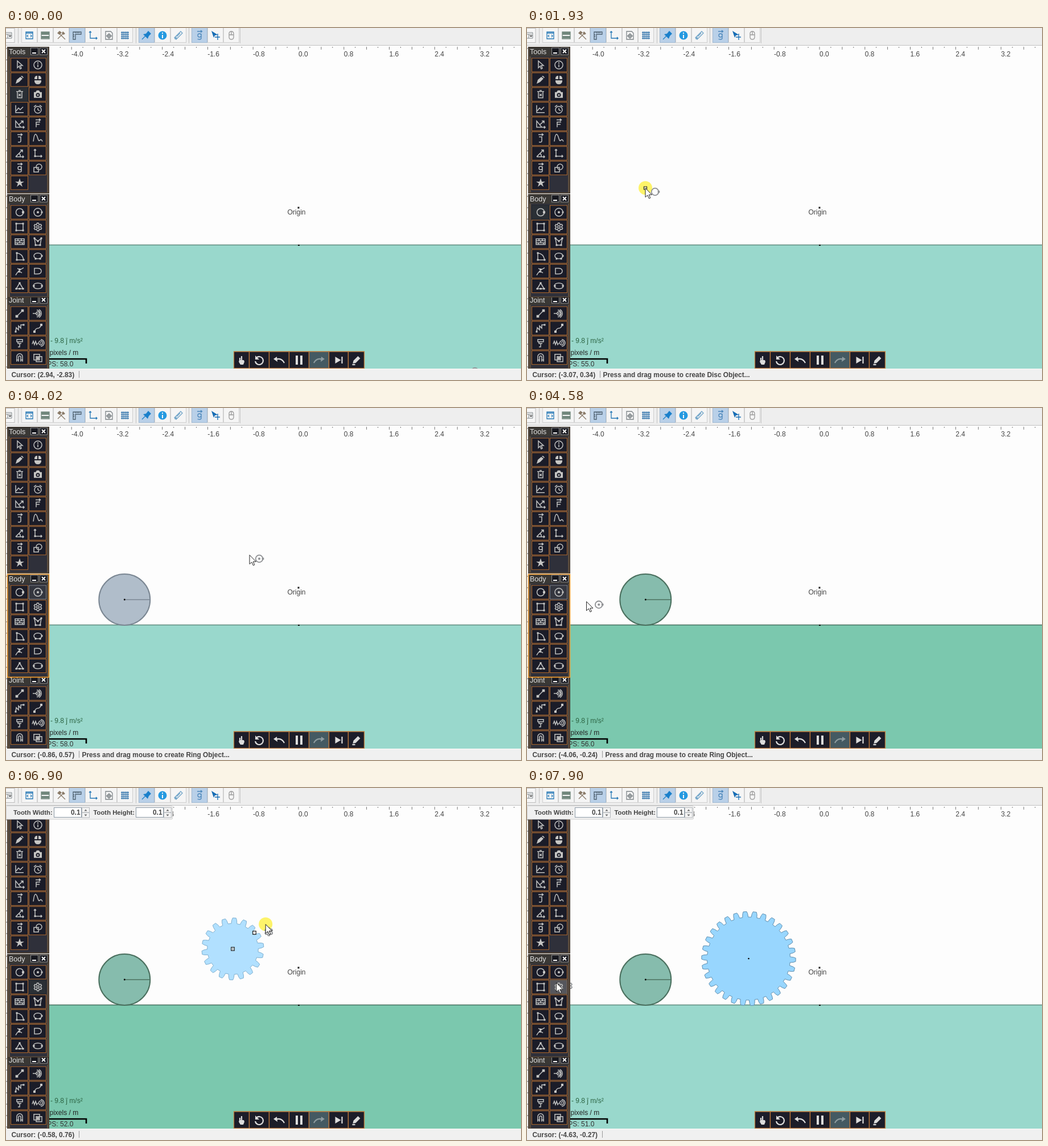
Write an HTML page that moves like this. It is 905x619 px and loops after 8 s.

```html
<!DOCTYPE html>
<html lang="en">
<head>
<meta charset="utf-8">
<title>Physics sandbox</title>
<style>
html, body { margin: 0; width: 100%; height: 100%; overflow: hidden; background: #fdfdfd; }
svg { display: block; width: 905px; height: 619px; }
text { font: 12px "Liberation Sans", Arial, sans-serif; white-space: pre; }
.b { font-weight: bold; font-size: 11.85px; fill: #444; }
.s { font-weight: bold; font-size: 11.3px; fill: #444; }
</style>
</head>
<body>
<svg id="stage" viewBox="0 0 905 619" xmlns="http://www.w3.org/2000/svg"></svg>
<script>
const LOOP = 8000, SCALE = 99.7, OX = 514, OY = 316;
const svg = document.getElementById('stage');

// Markup helpers
const rect = (x, y, w, h, fill, more = '') => `<rect x="${x}" y="${y}" width="${w}" height="${h}" fill="${fill}" ${more}/>`;
const line = (d, color, w = 1, more = '') => `<path d="${d}" fill="none" stroke="${color}" stroke-width="${w}" ${more}/>`;
const text = (x, y, s, more = '') => `<text x="${x}" y="${y}" ${more}>${s}</text>`;
const ring = (x, y, r, ry = r) => `M${x - r} ${y}a${r} ${ry} 0 1 0 ${2 * r} 0a${r} ${ry} 0 1 0 ${-2 * r} 0Z`;
const box = (x, y, r = 1.5) => `M${x - r} ${y - r}h${2 * r}v${2 * r}h${-2 * r}Z`;
const boxes = (...p) => p.map(([x, y]) => box(x, y)).join('');

function gearPath(x, y, r, n, height, half, phase) {
  const d = [];
  const at = (a, q) => d.push((x + q * Math.cos(a)).toFixed(2) + ' ' + (y + q * Math.sin(a)).toFixed(2));
  for (let i = 0; i < n; i++) {
    const a = phase + i * 2 * Math.PI / n;
    const side = [[half, 0], [half * .88, .6], [half * .6, 1]];
    for (const [w, h] of side) at(a - w / (r + h * height), r + h * height);
    for (const [w, h] of side.reverse()) at(a + w / (r + h * height), r + h * height);
  }
  return 'M' + d.join('L') + 'Z';
}
const smallGear = gearPath(0, 0, 4.8, 6, 2.2, 2, .5) + ring(0, 0, 2.2);
const vector = 'M-4-7H4M2-9L4.5-7 2-5';

// Panel icons: [stroked path, filled path]
const tools = [
  ['M-4-7V5L-1 2 1 7 3 6 1 1H5Z'],
  [ring(0, 0, 7) + 'M0-1V4', box(0, -3.5, 1)],
  ['', 'M-7 7L-5 0 1-5 5-2-1 4ZM2-6L4-7 7-4 6-3Z'],
  ['', 'M-6-1V-2Q-6-7-1-7V-1ZM1-1V-7Q6-7 6-2V-1ZM-6 1H6V3Q5 8 0 8T-6 3Z'],
  ['M-4-4V6H4V-4M-6-5H6M-2-7H2M-2-1L2 3M2-1L-2 3'],
  ['', 'M-7-4H-4L-2-7H2L4-4H7V6H-7Z' + ring(0, 1, 3.5) + ring(0, 1, 1.6)],
  ['M-7-7V6H7M-6 3L-2-2 1 1 6-4'],
  [ring(0, 1, 6) + 'M0-2V1L3 3M-7-4L-3-7M7-4L3-7'],
  ['M-7 6V-5L2 6ZM-1 1L6-5M2 6H8M6 4L8 6 6 8M2-5H6V-1'],
  ['M-3 6V-3H4M-3 1H3' + vector],
  ['M-3-3H2V4Q2 7-3 6' + vector],
  ['M-8 5C-6-12-3-10 0 0S4-4 8 5'],
  ['M-7 6L5-6M1-6H5V-2M-7 6H7M5 4L7 6 5 8M-1 0Q2 3 1 6'],
  ['M-5-7V5H7M-7-5L-5-7-3-5M5 3L7 5 5 7', box(-5, 5, 1.5)],
  [ring(0, 0, 3) + 'M3-3V5Q3 7 0 7T-3 6' + vector],
  [ring(2, -2, 5) + 'M-7-1H1V7H-7Z'],
  ['', 'M0-8L2-2H8L3 1 5 7 0 3-5 7-3 1-8-2H-2Z']
];
const body = [
  [ring(0, 0, 6.5), box(6, 0, 2)],
  [ring(0, 0, 7), ring(0, 0, 2) + box(7, 0)],
  ['M-6-6H6V6H-6Z', boxes([-6, -6], [6, -6], [-6, 6], [6, 6])],
  [smallGear],
  ['M-8-5H8V5H-8ZM-8-1.5H8M-8 2H8M-3-5V-1.5M3-5V-1.5M0-1V2M-4 2V5M5 2V5'],
  ['M-6-6L0-1 6-6 4 6H-4Z', boxes([-6, -6], [6, -6], [-4, 6], [4, 6], [0, -1])],
  ['M-5-6V6H7Q5-5-5-6Z', boxes([-5, -6], [-5, 6], [7, 6])],
  [ring(0, -1, 7, 5), boxes([-4, 4], [4, 4], [7, -1])],
  ['M-7 7Q-3-1 7-6M-4-5L1-2M-1 0L4 3', boxes([-1, 1], [0, -3])],
  ['M-6-5H-1Q6-5 6 0T-1 5H-6Z'],
  ['M0-5L-6 5H6Z', boxes([0, -5], [-6, 5], [6, 5], [0, 5])],
  [ring(0, 0, 8, 5), boxes([-7, 0], [7, 0])]
];
const joint = [
  ['M-5 5L5-5', box(-5, 5, 2.3) + box(5, -5, 2.3)],
  [ring(0, 0, 3) + 'M-2-6A6 6 0 0 1-2 6M2-7A8 8 0 0 1 2 7M-9 0H-3', box(0, 0, 1)],
  ['M-7 6L-6-1-2 3-2-4 2 0 2-6 7-6', box(-7, 6) + box(7, -6)],
  ['M-6 6Q-4 0 0 0T6-6', box(-6, 6, 2) + box(6, -6, 2)],
  ['M-5-6H5V-2H-5ZM-3-2V1H3M0 1V7H-3'],
  [ring(5, 0, 3.5) + 'M-10 2L-8-3-6 3-4-3-2 3 0 0M5-6A6 6 0 0 1 5 6', box(5, 0, 1)],
  ['M-5 7V-2A5 5 0 0 1 5-2V7M-2 7V-1A2 2 0 0 1 2-1V7M-6 4H-1M1 4H6'],
  ['M-7-6H3V4H-7ZM-3-2H7V7H-3Z', 'M-2-1H2V3H-2Z']
];

function button(icon, x, y, id) {
  const [s, f = ''] = icon;
  return rect(x, y - 12, 30, 24, '#1b1c28', `stroke="#b0692c" id="${id}"`) +
    `<g transform="translate(${x + 15.5} ${y})">${line(s, '#c0c1c0', 1.5)}<path d="${f}" fill="#c6c6c4" fill-rule="evenodd"/></g>`;
}
function panel(name, top, bottom, titleY, firstRow, icons) {
  const h = bottom - top;
  let s = rect(2, top, 74, h, '#594b3d') + rect(4, top + 1, 70, titleY + 8 - top, '#3a3835');
  s += rect(7, titleY + 9, 65, bottom - titleY - 11, '#2f303a');
  s += rect(2.5, top + .5, 73, h - 1, 'none', `id="${name}Edge"`);
  s += text(5, titleY + 5, name, 'fill="#e0e0e0" style="font-size:12.5px"');
  for (const x of [43, 59]) {
    s += rect(x + .5, titleY - 6, 13, 12, '#17181f', 'stroke="#8b8c90"');
  }
  s += line(`M46 ${titleY + 3}h7`, '#fff', 2) + line(`M63 ${titleY - 3}l6 6m0-6l-6 6`, '#fff', 1.8);
  icons.forEach((icon, i) => {
    s += button(icon, i % 2 ? 40.5 : 8.5, firstRow + 25.9 * (i >> 1), name + i);
  });
  return s;
}

function topBar() {
  const blue = '#2477b5', gray = '#7d8488';
  const items = [
    [41, 0, 'M-6-6H6V6H-6ZM-6-4H6M-2-1L-4 1-2 3M2-1L4 1 2 3', '', blue],
    [69, 0, 'M-7-6H7V6H-7Z', 'M-7-6H7V-1H-7ZM-7 1H7V5H-7Z', '#71877c'],
    [97, 0, 'M-6 6L5-5M-3-3L7 7', 'M-7-4L-3-8 1-5-3-1ZM3-7L7-3 4-1 1-4Z', '#8a7a68'],
    [125, 1, 'M-7-6H7V-2H-3V7H-7ZM-3-6V-4M0-6V-4M3-6V-4M-7-1H-5M-7 2H-5', '', '#4f6170'],
    [153, 0, 'M-5-7V5H7M-7-5L-5-7-3-5M5 3L7 5 5 7', '', blue],
    [181, 0, 'M-6-7H3L6-4V7H-6Z' + ring(0, 1, 3) + 'M0-4V6M-5 1H5', '', gray],
    [209, 0, 'M-5-7V7M-1.7-7V7M1.7-7V7M5-7V7M-7-5H7M-7-1.7H7M-7 1.7H7M-7 5H7', '', '#3f7cb0'],
    [247, 1, 'M-8 7L-1 0', 'M-6-2L-1-3 3-8 8-3 4 1 2 6Z', '#1b80cb'],
    [275, 0, '', ring(0, 0, 7.5) + 'M-1-5H1V-3H-1ZM-1-1H1V5H-1Z', '#2599e0'],
    [303, 0, 'M-7 4L4-7 7-4-4 7ZM-3 2L3-4', 'M-7 7L-5 2-2 5Z', '#70a4c8'],
    [340, 1, ring(0, 0, 3) + 'M3-3V5Q3 7 0 7T-3 6' + vector, '', '#4c87bb'],
    [368, 0, 'M4-3V8M-1 3H8', 'M-7-8L4-1-1 0-3 4Z', '#176db5'],
    [396, 0, 'M-4-3Q-4-7 0-7T4-3V3Q4 7 0 7T-4 3ZM-4-1H4M0-7V-1', '', '#9b9b9b']
  ];
  let s = rect(0, 0, 905, 31, '#eeeeee') + rect(0, 30, 905, 1, '#c2c2c2');
  s += rect(-10, .5, 25, 25, '#f7f7f7', 'stroke="#bbb"') + line('M-1 8H10V18H-1M0 11H9M3 11V18', gray) + '<path d="M4 13h6l-3 3z" fill="#555"/>';
  for (const [x, on, d, fill, c] of items) {
    s += rect(x - 13.5, -.5, 27, 26, on ? '#b9d0e8' : '#f5f5f5', `stroke="${on ? '#9fb8d2' : '#cfcfcf'}"`);
    s += `<g transform="translate(${x} 13)">${line(d, c, 1.3)}<path d="${fill}" fill="${c}" fill-rule="evenodd"/></g>`;
  }
  for (const x of [21.5, 228.5, 321.5, 411.5]) s += line(`M${x} 0V27`, '#c4c4c4');
  return s;
}

function ruler() {
  let s = rect(0, 31, 905, 24, '#fdfdfd');
  for (let i = -26; i < 20; i++) {
    const x = OX + i * SCALE / 5;
    s += line(`M${x.toFixed(1)} 33v${i % 2 ? 2 : 5}`, '#777');
    if (i % 4 === 0) s += text((x - (i < 0 ? .3 : 0)).toFixed(1), 50, (i / 5).toFixed(1), 'fill="#444"');
  }
  return s;
}

function player() {
  const edges = [400, 427, 462, 497, 532, 567, 601, 629];
  const icons = [
    ['M-3 1V-4M0 0V-7', 'M-4 0L4 0 5 3 3 8H-2L-5 3Z'],
    ['M-5-4A7 7 0 1 1-7 2', 'M-7-8V-1H0Z'],
    ['M-6-1Q4-5 9 5', 'M-10-2L-4-6-3 3Z'],
    ['', 'M-6-8H-2V8H-6ZM2-8H6V8H2Z'],
    ['M6-1Q-4-5-9 5', 'M10-2L4-6 3 3Z'],
    ['M6-6V6', 'M-6-6L4 0-6 6Z'],
    ['M-7 8H-2', 'M-6 6L-5 1 3-7 7-3-1 5Z']
  ];
  return icons.map(([d, f], i) => {
    const x = edges[i], w = edges[i + 1] - x, off = i === 4, c = off ? '#8d9ca0' : '#dcdcdc';
    return rect(x + .5, 569, w, 29.5, off ? '#445a62' : '#1c1d29') +
      line(`M${x + .5} 569h${w}v29.5h${-w}Z`, '#c07a3c', 1.3) +
      `<g transform="translate(${x + w / 2 + .5} 584)">${line(d, c, 2.2)}<path d="${f}" fill="${c}"/></g>`;
  }).join('');
}

function spinner(x, label, labelX) {
  return text(labelX, 47, label, 'class="s"') + rect(x + .5, 34.5, 48, 17, '#fff', 'stroke="#8d9aa6"') +
    text(x + 46.5, 47, '0.1', 'class="b" text-anchor="end"') +
    [34.5, 43.5].map(y => rect(x + 49.5, y, 13, 8.5, '#f4f4f4', 'stroke="#b4b8bc"')).join('') +
    `<path d="M${x + 53.5} 40.5l2.5-3 2.5 3zM${x + 53.5} 46.5l2.5 3 2.5-3z" fill="#666"/>`;
}

let leftTicks = '';
for (let y = 36; y < 599; y += 20) leftTicks += `M0 ${y}h2`;

svg.innerHTML =
  rect(0, 0, 905, 619, '#fdfdfd') + ruler() +
  rect(0, 381, 905, 220, '#99d8cc', 'id="ground"') +
  '<path id="surface" d="M0 381.5H905" stroke-width="1.7"/>' +
  rect(512.5, 314.5, 3, 3, '#222') + rect(513, 381, 3, 2, '#111') +
  text(494.5, 328, 'Origin', 'fill="#444"') +
  '<g id="disc"><circle id="discBody" stroke-width="2"/><path id="spoke" stroke-width="1.6"/><circle r="1.4"/></g>' +
  '<path id="gear" stroke-linejoin="round"/><g id="dot"><circle r="1.3"/></g>' +
  '<circle id="click" r="12" fill="#fdf36a"/><path id="grips" fill="#fff" fill-opacity=".6" stroke="#222" stroke-width="1.2"/>' +
  '<g id="badge"><path id="badgeLine" fill="none" stroke="#8f9194" stroke-width="1.8"/><path id="badgeFill" fill="#8f9194"/></g>' +
  text(78, 554, '- 9.8 ĵ m/s²', 'fill="#2d6544"') + text(76.5, 575, 'pixels / m', 'fill="#222"') +
  line('M70 582H141V590', '#000', 2.6) + text(65, 595, '', 'fill="#333" id="fps"') +
  rect(0, 31, 3, 570, '#f3f3f3') + line(leftTicks, '#666') +
  panel('Tools', 33, 291, 41, 65, tools) +
  panel('Joint', 474, 600, 478, 502, joint) +
  panel('Body', 292, 474, 300, 324, body) +
  player() +
  rect(0, 599, 905, 20, '#f0f0f0') + rect(0, 599, 905, 1, '#fafafa') +
  text(9.5, 614, '', 'class="b" id="coords"') + '<path id="bar" stroke="#999"/>' + text(0, 614, '', 'class="b" id="hint"') +
  topBar() +
  `<g id="options">${rect(0.5, 31.5, 292, 23.5, '#f0f0f0', 'rx="2" stroke="#d0d0d0"')}${spinner(84, 'Tooth Width:', 13)}${spinner(228, 'Tooth Height:', 153.5)}<path id="caret" d="M114.5 36v14" stroke="#222"/></g>` +
  '<circle id="press" r="12" fill="#fdf36a" fill-opacity=".75"/>' +
  '<path id="arrow" d="M0-.5V15.5L3.8 12 6.4 17.8 8.8 16.8 6.3 11.2H11.4Z" fill="#fff" stroke="#222"/>';

const el = {};
svg.querySelectorAll('[id]').forEach(n => el[n.id] = n);
const set = (id, attrs) => { for (const k in attrs) el[id].setAttribute(k, attrs[k]); };
const show = (id, on) => set(id, { visibility: on ? 'visible' : 'hidden' });
const move = (id, x, y) => set(id, { transform: `translate(${x} ${y})` });
for (const name of ['Tools', 'Joint']) set(name + 'Edge', { stroke: '#3f352b' });

const bursts = [[0, 0, 1], [100, 170, 2], [390, 1170, 8], [1270, 1390, 2], [1600, 1700, 2], [1930, 2690, 8],
  [2810, 3580, 8], [3680, 3800, 2], [4020, 4360, 4], [4580, 5360, 8], [5460, 6230, 8], [6450, 6450, 1],
  [6680, 6680, 1], [6900, 7680, 8], [7780, 7900, 2]];
const steps = bursts.flatMap(([a, b, n]) => Array.from({ length: n }, (_, i) => a + (n > 1 ? (b - a) * i / (n - 1) : 0)));

// Pointer route: time, x, y
const route = [[0, 807, 598], [90, 807, 598], [100, 640, 545], [165, 427, 494], [350, 427, 494], [900, 40, 345],
  [1050, 22, 325], [1400, 22, 325], [1690, 208, 282], [1980, 208, 282], [2260, 246, 306], [2480, 246, 306],
  [2650, 214, 326], [2690, 206, 326], [3250, 54, 325], [3590, 54, 325], [3750, 428, 259], [4060, 428, 259],
  [4360, 130, 335], [5000, 56, 352], [5370, 56, 352], [5420, 81, 349], [5460, 111, 344], [5900, 398, 283],
  [6700, 398, 283], [6850, 456.2, 240.2], [7020, 456.2, 240.2], [7600, 58, 352], [7860, 52.4, 343], [7900, 51.5, 343], [8000, 51.5, 343]];
function pointer(t) {
  if (t <= 0) return route[0].slice(1);
  const i = route.findIndex(k => k[0] >= t);
  const [a, b] = [route[i - 1], route[i]], u = (t - a[0]) / (b[0] - a[0]);
  return [a[1] + (b[1] - a[1]) * u, a[2] + (b[2] - a[2]) * u];
}
const last = (list, t) => list.filter(k => k[0] <= t).pop()[1];
const fps = [[0, 58], [170, 56], [800, 57], [1270, 55], [2260, 54], [3100, 56], [3680, 58], [4300, 56], [5100, 54], [5900, 53], [6230, 52], [7300, 51]];
const hints = [[0, ''], [1270, 'Press and drag mouse to create Disc Object...'], [2000, ''],
  [3400, 'Press and drag mouse to create Ring Object...'],
  [5460, 'Press and Drag  to Create Gear (adjust tooth size from spinners in toolbar ) ...'], [6900, '']];

const looks = {
  normal: ['#1b1c28', '#b0692c', ''],
  picked: ['#2a2f35', '#23262c', ''],
  focus: ['#34363f', '#c8c8c8', '1 1'],
  bright: ['#68696e', '#d0d0d0', '1 1'],
  hover: ['#55565c', '#7d6348', '']
};
function look(id, name) {
  const [fill, stroke, dash] = looks[name];
  set(id, { fill, stroke, 'stroke-dasharray': dash });
}
const fall = (from, start, to, t) => t < start ? from : Math.min(to, from + 490 * ((t - start) / 1000) ** 2);

function draw(now) {
  const t = steps.filter(s => s <= now).pop();
  const within = (a, b) => t >= a && t < b;
  const [x, y] = pointer(t), [ax, ay] = pointer(t - 40);

  // Sleeping bodies turn darker
  const asleep = within(4200, 7250);
  set('ground', { fill: asleep ? '#7bc8ae' : '#99d8cc' });
  set('surface', { stroke: asleep ? '#48705f' : '#5f8a7e' });

  const r = 45 * Math.min(1, Math.max(0, (t - 1930) / 430));
  const ink = t >= 4200 ? '#4b705f' : '#7b8793';
  show('disc', r > 0);
  move('disc', 208.3, fall(282, 2436, 337, t));
  set('discBody', { r, fill: t >= 4200 ? '#86bcad' : '#b0bdca', stroke: ink });
  set('spoke', { d: `M0 0H${r}`, stroke: ink });

  const made = t >= 7080, gr = t < 7000 ? 44.8 : 73;
  const roll = 9 * (Math.max(0, t - 7300) / 600) ** 2;
  const gx = 398.5 - roll, gy = fall(283, 7080, 300, t);
  const phase = (made ? 7.7 : -7) * Math.PI / 180 - roll / 83;
  show('gear', t >= 6900);
  set('gear', {
    d: gearPath(gx, gy, gr, Math.round(gr / 2.43), 9.7, 5, phase),
    fill: made ? '#98d6fe' : '#b1e0ff', stroke: made ? '#5f8fb0' : '#7fb0d0'
  });
  show('dot', t >= 6680);
  move('dot', gx, gy);

  const discGrip = within(1930, 2400), gearGrip = within(6680, 7080);
  const end = within(6900, 7000) ? [436.5, 254.5] : [ax, ay];
  show('grips', discGrip || gearGrip);
  set('grips', { d: discGrip ? box(208, 281.5, 2.5) + (t > 2000 ? box(ax, ay, 2.5) : '')
    : box(398.5, 283, 2.8) + (t >= 6900 ? box(...end, 2.8) : '') });
  show('click', discGrip || within(6450, 7080));
  move('click', x, y - .8);
  show('press', within(1050, 1170) || within(3300, 3450) || within(5200, 5350));
  move('press', x, y);

  const kind = t < 3400 ? 'disc' : t < 5400 ? 'ring' : 'gear';
  show('badge', !within(5400, 5500));
  set('badgeLine', { d: kind === 'gear' ? smallGear : ring(0, 0, 6.3) });
  set('badgeFill', { d: kind === 'gear' ? '' : box(6.5, 0, 1.8) + (kind === 'ring' ? ring(0, 0, 2) : '') });
  if (kind !== 'gear') move('badge', ax + 17, ay + 6);
  else if (made) move('badge', ax + 20, ay + 5);
  else move('badge', ax + 5.5, ay + 12.5);
  show('arrow', t >= 100);
  move('arrow', x, y);

  look('Tools4', t < 1270 ? 'picked' : 'normal');
  look('Body0', within(1050, 1270) ? 'hover' : within(1270, 1930) ? 'focus' : within(1930, 3400) ? 'picked' : 'normal');
  look('Body1', within(3200, 3400) ? 'hover' : within(3400, 5360) ? 'focus' : 'normal');
  look('Body3', within(5000, 5350) ? 'hover' : within(5350, 6680) ? 'bright' : within(6680, 7600) ? 'picked' : t >= 7600 ? 'hover' : 'normal');
  const active = within(1270, 1930) || within(3400, 6680);
  set('BodyEdge', { stroke: active ? '#ee9a2c' : '#3f352b', 'stroke-width': active ? 1.6 : 1 });

  const coords = `(${((ax - OX) / SCALE).toFixed(2)}, ${((OY - ay) / SCALE).toFixed(2)})`;
  const sep = 124 + 4 * (coords.split('-').length - 1);
  el.coords.textContent = 'Cursor: ' + coords;
  el.hint.textContent = last(hints, t);
  set('hint', { x: sep + 5.5 });
  set('bar', { d: `M${sep + .5} 603V615` });
  el.fps.textContent = 'FPS: ' + last(fps, t).toFixed(1);
  show('options', t >= 5460);
  show('caret', within(5460, 5700));
}

function tick() {
  draw(performance.now() % LOOP);
  requestAnimationFrame(tick);
}
tick();
</script>
</body>
</html>
```
